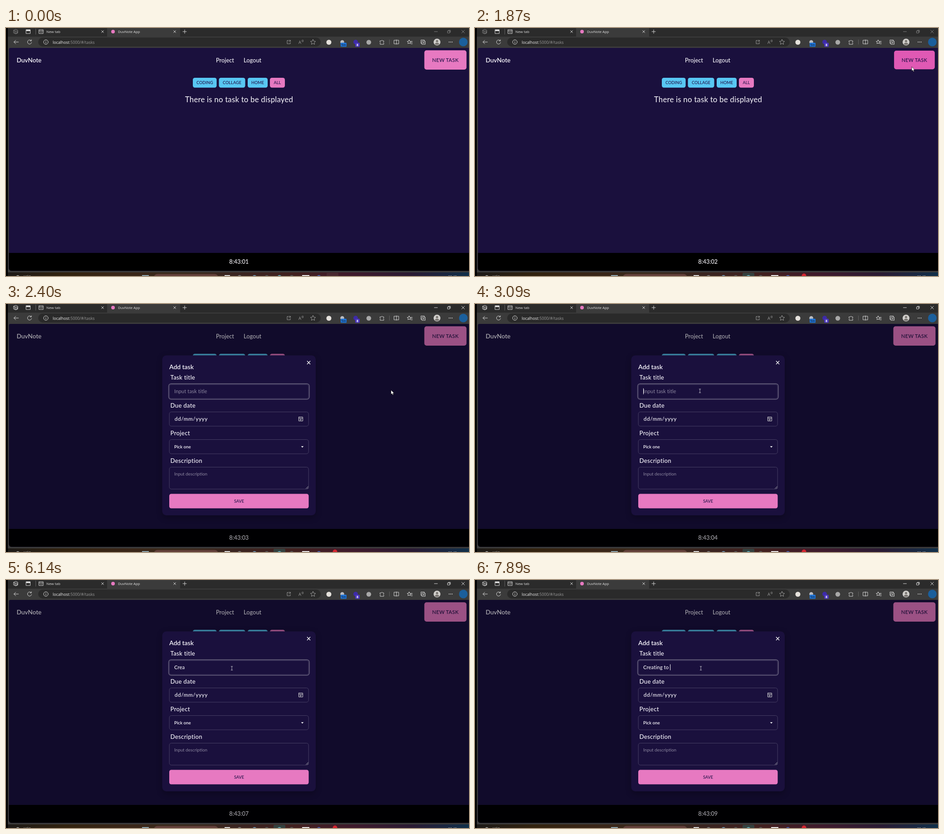
Animation of 1021x548 px, one loop 8 s. Source, as an HTML page:

```html
<!DOCTYPE html>
<html lang="en">
<head>
<meta charset="utf-8">
<title>Task list</title>
<style>
  html, body { margin: 0; width: 100%; height: 100%; overflow: hidden; background: #000; }
  svg { display: block; width: 100vw; height: 100vh; }
  text { white-space: pre; }
  .app text { font-family: Lato, "Open Sans", sans-serif; font-weight: 500; fill: #f9f7fd; }
  .chrome text, .taskbar text { font-family: "Open Sans", "Noto Sans", sans-serif; }
  .icon { fill: none; stroke: #d6d6d6; stroke-width: 1; stroke-linecap: round; stroke-linejoin: round; }
  .app .bold { font-weight: 600; }
  .app .light { font-weight: 400; }
  .app .dark { fill: #201047; }
  .app .hint { fill: #8d87a0; font-weight: 400; }
  .field { fill: none; stroke: #473f64; stroke-width: 1; }
</style>
</head>
<body>
<svg id="stage" viewBox="0 0 1021 548"></svg>
<script>
const PINK = '#e779c1', BLUE = '#58c7f3', BASE = '#1a103d', LOOP = 8000;

const rect = (x, y, w, h, r, fill, more = '') =>
  `<rect x="${x}" y="${y}" width="${w}" height="${h}" rx="${r}" fill="${fill}" ${more}/>`;
const circle = (x, y, r, fill, more = '') => `<circle cx="${x}" cy="${y}" r="${r}" fill="${fill}" ${more}/>`;
const text = (x, y, size, str, more = '', gap = 0) =>
  `<text x="${x}" y="${y}" font-size="${size}" letter-spacing="${gap}" ${more}>${str}</text>`;
const icon = (x, y, d, more = '') => `<path class="icon" transform="translate(${x} ${y})" d="${d}" ${more}/>`;
const mid = 'text-anchor="middle"';
const cross = r => `M${-r} ${-r}L${r} ${r}M${r} ${-r}L${-r} ${r}`;
const box = (w, h) => `M${-w} ${-h}H${w}V${h}H${-w}Z`;
const star = r => {
  let d = '';
  for (let i = 0; i < 10; i++) {
    const a = Math.PI * i / 5, q = i % 2 ? r * 0.48 : r;
    d += `${i ? 'L' : 'M'}${(q * Math.sin(a)).toFixed(2)} ${(-q * Math.cos(a)).toFixed(2)}`;
  }
  return d + 'Z';
};

function chrome() {
  const controls =
    icon(21.5, 8, 'M-4.5 -3L0 -5L4.5 -3V3L0 5L-4.5 3ZM-1.5 -1H3V3H-1.5ZM-4.5 -3L-1.5 -1') +
    icon(948, 8, 'M-3.5 0H3.5') +
    icon(977, 8, 'M-3 -1.5H1.5V3H-3ZM-1.5 -3H3V1.5') +
    icon(1008, 8, cross(3.2));
  return `<g class="chrome">
    ${rect(4, 0, 1017, 548, 0, '#3b3b3b')}
    ${rect(4, 0, 1017, 19, 0, '#2b2b2b')}
    ${rect(223, -5, 161, 30, 5, '#3b3b3b')}
    <g id="controls">${controls}</g>
    ${icon(49, 8, box(4.5, 4.2))}${rect(44.5, 3.8, 9, 3, 1, '#e4e4e4')}
    ${icon(65.5, 8, 'M0 -6V6', 'style="stroke:#606060"')}
    ${icon(77.5, 8, box(4.5, 4.2) + 'M-4.5 -1.5H4.5M-2 1.5H-1M1 1.5H2')}
    ${text(89, 11, 8, 'New tab', 'fill="#e0e0e0"')}
    ${circle(236, 8, 4, PINK)}
    ${text(247, 11, 7.8, 'DuvNote App', 'fill="#e6e6e6"')}
    ${icon(213, 8, cross(2.4))}${icon(372, 8, cross(2.4))}${icon(394, 8, 'M-4 0H4M0 -4V4')}
    ${icon(22.5, 31, 'M5 0H-5M-1 -4L-5 0L-1 4')}
    ${icon(52, 31, 'M4.5 1A4.6 4.6 0 1 1 3.4 -3.2M4 -5.2V-2.4H1.2')}
    ${rect(71, 21, 623, 20, 10, '#2a2a2a')}
    ${icon(88, 31, 'M5 0A5 5 0 1 1 -5 0A5 5 0 1 1 5 0M0 -.6V2.4M0 -2.6V-2.4')}
    ${text(103, 34.5, 8.8, 'localhost<tspan fill="#9a9a9a">:5000/#/tasks</tspan>', 'fill="#f2f2f2"')}
    <g opacity=".65">
      ${icon(623.5, 31, 'M-.5 -3.5H-3.5V3.8H3.5V1M1 -3.8H3.8V-1M3.8 -3.8L0 0')}
      ${text(645, 35, 9.5, 'A', 'fill="#d6d6d6"')}
      ${icon(652.5, 28, 'M0 -1Q1.5 .5 0 2M2 -2Q4.5 .5 2 3')}
      ${icon(677, 31.3, star(6))}
    </g>
    ${circle(712, 31.5, 5.5, '#e6e2dd')}
    ${circle(741.5, 31, 4.3, '#b9bcc2')}
    ${rect(738, 32.5, 13, 9, 1.5, '#1f74d8')}${text(744.5, 39.7, 7, '5m', mid + ' fill="#101820"')}
    ${circle(771, 31, 5, '#3d2ba6')}
    ${rect(770, 32.5, 10, 9, 1.5, '#4a35bd')}${text(775, 39.7, 7, '8', mid + ' fill="#fff" font-weight="700"')}
    ${circle(800, 31.5, 5.2, '#a8a8a8')}
    ${icon(829, 31.5, 'M-4 -3H-1.5A1.7 1.7 0 0 1 1.8 -3H4V-.5A1.5 1.5 0 0 0 4 2V4.5H-4V2A1.5 1.5 0 0 0 -4 -.5Z')}
    ${icon(845.5, 31, 'M0 -5V5', 'style="stroke:#606060"')}
    ${icon(861, 31, box(5, 4) + 'M0 -5V5')}
    ${icon(889, 31, star(4.6))}${icon(893.5, 31, 'M-1 -1.5H2.5M-1 1.2H2.5M0 4H2.5')}
    ${icon(919.5, 31, 'M-2 -2H5V5H-2ZM-2 3H-4.5V-4.5H3V-2M1.5 0V3M0 1.5H3')}
    ${circle(950.5, 31, 7.6, '#cfcdca')}
    ${circle(950.5, 29, 2.5, '#77736f')}<path d="M945.8 36Q946 32.4 950.5 32.4T955.2 36Q950.5 38.6 945.8 36Z" fill="#77736f"/>
    ${[-3.3, 0, 3.3].map(d => circle(980.5 + d, 31, 0.9, '#e0e0e0')).join('')}
    ${circle(1008.5, 31, 9.5, '#1b5f9c')}
  </g>`;
}

function page() {
  const tags = [['CODING', 412, 52.5], ['COLLAGE', 469.5, 58], ['HOME', 533, 44], ['ALL', 582, 33]];
  return `<clipPath id="view"><path d="M6.5 47Q6.5 44 9.5 44H1021V536.5H12.5Q6.5 536.5 6.5 530.5Z"/></clipPath>
  <g class="app" clip-path="url(#view)">
    ${rect(6, 44, 1015, 493, 0, BASE)}
    ${text(23.5, 76, 13.6, 'DuvNote', 'class="bold"')}
    ${text(463, 75.5, 12.7, 'Project', '', 0.05)}
    ${text(524, 75.5, 12.7, 'Logout', '', 0.1)}
    <g id="newTask">
      ${rect(922.5, 49.3, 93, 42.6, 5, PINK, 'id="newFill"')}
      ${text(969, 74.7, 11.2, 'NEW TASK', mid + ' class="dark"', 0.3)}
    </g>
    ${tags.map(([s, x, w]) => rect(x, 110, w, 21.7, 4.5, s === 'ALL' ? PINK : BLUE) +
      text(x + w / 2, 124.3, 9, s, mid + ' class="dark"', 0.12)).join('')}
    ${text(514, 164, 16.8, 'There is no task to be displayed', mid + ' class="light"', 0.22)}
    ${rect(6, 497, 1015, 41, 0, '#000')}
    ${text(513.7, 521.3, 12.6, '', mid + ' id="clock"')}
    ${rect(6, 44, 1015, 493, 0, '#000008', 'id="shade" opacity=".33"')}
    <g id="modal">${modal()}</g>
  </g>`;
}

function modal() {
  const label = (y, s) => text(362.5, y, 13.2, s, '', 0.3);
  const field = (y, h) => `<rect class="field" x="360.2" y="${y}" width="307" height="${h}" rx="4.5"/>`;
  return `
    ${rect(344.5, 116, 338.5, 357, 10, '#000', 'opacity=".25" filter="url(#soft)"')}
    ${rect(344.5, 113.5, 338.5, 353.5, 9, BASE)}
    ${icon(667.5, 129.5, cross(3.2), 'style="stroke:#fff;stroke-width:1.3"')}
    ${text(360, 143.7, 13.9, 'Add task', 'class="bold"')}
    ${label(167.3, 'Task title')}${label(228.5, 'Due date')}${label(289.5, 'Project')}${label(350.5, 'Description')}
    <rect class="field" x="358.6" y="176.2" width="310.4" height="34.4" rx="5.5" style="stroke:#6b6580;stroke-width:1.4"/>
    ${field(178, 31)}${field(238.5, 31.5)}${field(299.5, 31.5)}${field(360.5, 48.5)}
    ${text(371, 197, 11.2, 'Input task title', 'class="hint" id="hint"', 0.1)}
    ${text(371, 197, 11.2, '', 'id="typed"', 0.12)}
    ${rect(371, 186.3, 1, 13.2, 0, '#fff', 'id="caret"')}
    ${text(371.8, 257.7, 11.8, 'dd/mm/yyyy', '', 0.55)}
    ${icon(650, 254, 'M-4 -4.3H4Q4.5 -4.3 4.5 -3.8V4Q4.5 4.5 4 4.5H-4Q-4.5 4.5 -4.5 4V-3.8Q-4.5 -4.3 -4 -4.3ZM-4.5 -1.8H4.5M-2 .5H2M-2 2.5H1')}
    ${text(371, 318.6, 9.7, 'Pick one', 'class="bold"')}
    <path d="M650.7 314.3H656.3L653.5 317.3Z" fill="#fff"/>
    ${text(371, 379.2, 9.8, 'Input description', 'class="hint"')}
    ${icon(664, 405.5, 'M-2.5 2.5L2.5 -2.5M.5 2.5L2.5 .5', 'style="stroke-width:.8"')}
    ${rect(360, 419.5, 307.5, 32, 4.5, PINK)}
    ${text(514, 438.7, 9, 'SAVE', mid + ' class="dark"', 0.12)}`;
}

function taskbar() {
  const stops = ['#1d1a17', '#33230f', '#3a2618', '#3a2a1c', '#3a2420', '#42201f', '#3f1a2c', '#2a1a33', '#10304a'];
  const apps = [[515, '#777'], [548, '#6b8fa8'], [575, '#555'], [603, '#5ea6b0'], [630, '#555'], [690, '#4a63b0']];
  return `<linearGradient id="bar">${stops.map((c, i) =>
      `<stop offset="${i / (stops.length - 1)}" stop-color="${c}"/>`).join('')}</linearGradient>
  <g class="taskbar">
    ${rect(4, 540, 1017, 8, 0, 'url(#bar)')}
    ${rect(707, 541, 26, 12, 2, '#4a2930', 'id="oldApp"')}
    ${rect(590, 541, 26, 12, 2, '#33403e', 'id="newApp"')}
    ${circle(26, 551, 4.5, '#b9b9b9')}
    ${text(38, 551.5, 7.5, '10°C', 'fill="#e8e8e8"')}
    ${rect(300, 546, 15, 15, 0, '#8fa9b5')}
    ${rect(326, 543.5, 142, 20, 8, '#63403a')}
    ${rect(482, 546, 12, 8, 0, '#ddd')}
    ${apps.map(([x, c]) => circle(x, 551, 5, c)).join('')}
    ${rect(653, 546, 16, 8, 0, '#eee')}
    ${circle(725.5, 547.5, 5, '#d3252f', 'id="dot"')}
    ${text(975, 551.5, 7.5, '20:43', 'fill="#eee"')}
  </g>`;
}

document.getElementById('stage').innerHTML = `
  <filter id="soft" x="-20%" y="-20%" width="140%" height="140%"><feGaussianBlur stdDeviation="7"/></filter>
  ${rect(0, 0, 1021, 548, 0, '#000')}${chrome()}${page()}${taskbar()}
  <path id="arrow" d="M0 0V9.6L2.2 7.6L3.7 11L5.4 10.2L4 7H7Z" fill="#fff" stroke="#000" stroke-width=".7"/>
  <path id="beam" class="icon" d="M-1.8 -4H1.8M0 -4V4M-1.8 4H1.8" style="stroke:#c4c2cc;stroke-width:.9"/>`;

const $ = Object.fromEntries([...document.querySelectorAll('[id]')].map(e => [e.id, e]));
const set = (el, o) => { for (const k in o) el.setAttribute(k, o[k]); };
const show = (el, on) => set(el, { visibility: on ? 'visible' : 'hidden' });
const ramp = (t, a, b) => Math.max(0, Math.min(1, (t - a) / (b - a)));

// Pointer path: time, x, y
const path = [
  [700, 722, 550], [790, 738, 535], [930, 850, 420], [1070, 955, 290], [1200, 1002, 190],
  [1340, 966.5, 114], [1460, 966, 89], [1530, 964, 85], [1800, 963, 85.5], [1990, 963, 85.5],
  [2000, 951, 110], [2080, 945, 122], [2270, 928, 150], [2400, 850, 190], [2600, 650, 215],
  [2800, 510, 196], [2940, 494, 190], [3080, 495, 191], [3090, 496, 192], [3420, 496, 192], [3550, 498, 195]
];
const ticks = [930, 1990, 2900, 3900, 4900, 5880, 6890, 7890];
const title = 'Creating to ';
const keys = [4690, 4900, 5420, 5690, 6280, 6490, 6760, 6960, 7160, 7360, 7620, 7890];

function pointer(t) {
  const i = path.findIndex(p => p[0] > t);
  if (i < 0) return path[path.length - 1].slice(1);
  if (!i) return [722, 570];
  const [a, x, y] = path[i - 1], [b, u, v] = path[i], k = ramp(t, a, b);
  return [x + (u - x) * k, y + (v - y) * k];
}

function draw(t) {
  const open = t >= 1995;

  const hover = open ? 0 : ramp(t, 1500, 1650);
  const press = t > 1790 && !open ? 0.965 : 1;
  set($.newFill, { fill: `rgb(${231 - 7 * hover},${121 - 32 * hover},${193 - 13 * hover})` });
  set($.newTask, { transform: `translate(969 70.6) scale(${press}) translate(-969 -70.6)` });

  $.clock.textContent = '8:43:0' + (1 + ticks.filter(k => k <= t).length);
  show($.shade, open);
  show($.modal, open);
  const scale = 0.997 + 0.003 * ramp(t, 2000, 2100);
  set($.modal, {
    opacity: 0.97 + 0.03 * ramp(t, 2000, 2100),
    transform: `translate(514 290) scale(${scale}) translate(-514 -290)`
  });

  const count = keys.filter(k => k <= t).length;
  $.typed.textContent = title.slice(0, count);
  show($.hint, open && !count);
  const since = t - (count ? keys[count - 1] : 3000) + 50;
  show($.caret, t > 2450 && !(Math.floor(since / 500) & 1));
  set($.caret, { x: 371 + (count ? $.typed.getComputedTextLength() : 0) });

  const [x, y] = pointer(t);
  const overInput = open && x > 360 && x < 667 && y > 177 && y < 210;
  show($.beam, overInput);
  show($.arrow, !overInput);
  set(overInput ? $.beam : $.arrow, { transform: `translate(${x} ${y})` });

  set($.controls, { opacity: t < 2340 ? 0.5 : 1 });
  set($.dot, { opacity: ramp(t, 100, 320) });
  show($.oldApp, t < 1600);
  show($.newApp, t >= 1600);
}

const start = performance.now();
function loop() {
  draw((performance.now() - start) % LOOP);
  requestAnimationFrame(loop);
}
draw(0);
requestAnimationFrame(loop);
</script>
</body>
</html>
```
